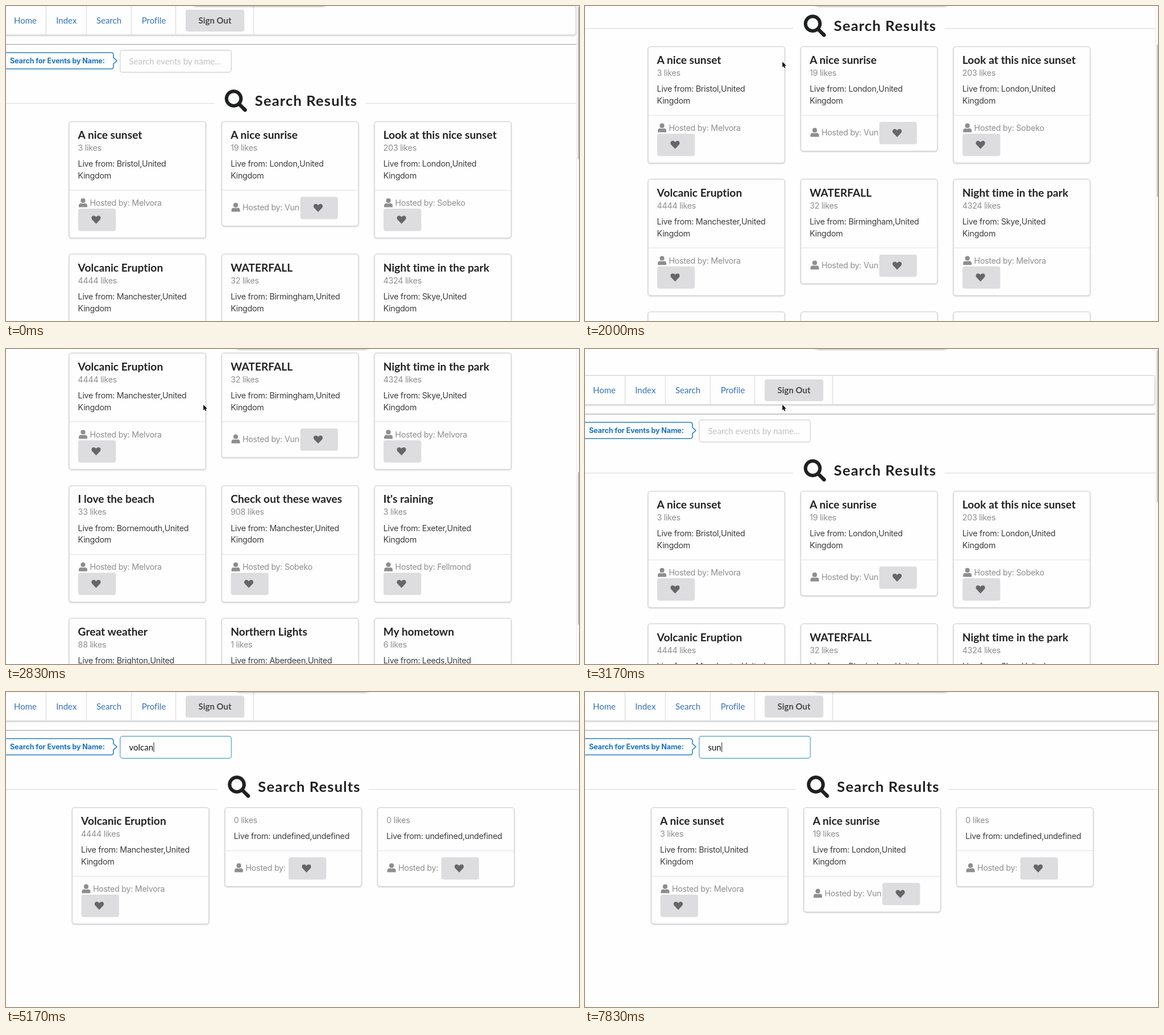
Animation, 1008 px wide and 555 px high, one loop 8 s. Source, as an HTML page:

```html
<!DOCTYPE html>
<html lang="en">
<head>
<meta charset="utf-8">
<title>Event search</title>
<style>
  html, body { margin: 0; width: 100%; height: 100%; overflow: hidden; background: #fefefe; }
  svg { display: block; }
  text { font: 14.3px Inter, sans-serif; letter-spacing: -.02em; fill: #3d3d3d; }
  .grey { fill: #8e8e8e; }
  .title { font: bold 19.2px Lato, sans-serif; letter-spacing: 0; fill: #222; }
  .heading { font: bold 25.6px Lato, sans-serif; letter-spacing: 1.1px; fill: #1f2021; }
  .nav, .field { font: 15px Lato, sans-serif; letter-spacing: 0; }
  .title, .heading, .nav, .field { font-variant-ligatures: none; }
  .nav { fill: #3572b8; text-anchor: middle; }
  .sign { font-weight: bold; fill: #48494a; }
  .field { fill: #111; }
  .hint { fill: #c2c2c4; }
  .label { font-weight: bold; font-size: 12.6px; letter-spacing: -.01em; fill: #1a74c0; }
  .box { fill: #fefefe; stroke: #d3d3d5; stroke-width: 1.3; }
  .raised { filter: drop-shadow(0 1px 1px #d4d4d5); }
  .rule { stroke: #dededf; stroke-width: 1.3; }
  .button { fill: #dddddf; }
  .notch { fill: #fff; filter: drop-shadow(0 1px 2px #0009); }
</style>
</head>
<body>
<svg id="stage" width="1008" height="555" viewBox="0 0 1008 555"></svg>
<script>
const LOOP = 8000, STEP = 1000 / 6;
const stage = document.getElementById("stage");
const pen = document.createElement("canvas").getContext("2d");

// title, likes, place, host
const events = [
  ["A nice sunset", 3, "Bristol", "Melvora"],
  ["A nice sunrise", 19, "London", "Vun"],
  ["Look at this nice sunset", 203, "London", "Sobeko"],
  ["Volcanic Eruption", 4444, "Manchester", "Melvora"],
  ["WATERFALL", 32, "Birmingham", "Vun"],
  ["Night time in the park", 4324, "Skye", "Melvora"],
  ["I love the beach", 33, "Bornemouth", "Melvora"],
  ["Check out these waves", 908, "Manchester", "Sobeko"],
  ["It's raining", 3, "Exeter", "Fellmond"],
  ["Great weather", 88, "Brighton", "Melvora"],
  ["Northern Lights", 1, "Aberdeen", "Sobeko"],
  ["My hometown", 6, "Leeds", "Melvora"],
];
const blank = ["", 0, "", ""];

// Keyframes are [step, value] pairs with straight lines between them.
const scrollKeys = [[10, 0], [11, 35], [12, 132], [13, 280], [14, 413], [15, 520], [16, 575],
  [17, 430], [18, 120], [19, -47], [20, -22], [21, -6], [22, 0]];
const notchKeys = [[0, 323], [1, 350], [2, 398]];
const cursorX = [[4, 540], [7, 410], [10, 347.3], [20, 347.3], [23, 319.8]];
const cursorY = [[4, 30], [7, 80], [10, 98.3], [20, 98.3], [23, 102.8]];

function track(keys, step) {
  const next = keys.findIndex(key => key[0] > step);
  if (next < 0) return keys[keys.length - 1][1];
  if (next === 0) return keys[0][1];
  const [s0, v0] = keys[next - 1], [s1, v1] = keys[next];
  return v0 + (v1 - v0) * (step - s0) / (s1 - s0);
}

function queryAt(step) {
  if (step >= 44) return "sun".slice(0, step - 43);
  const count = step < 35 ? Math.min(step - 25, 8) : step < 38 ? 42 - step : 40 - step;
  return "volcanic".slice(0, Math.max(0, count));
}

function resultsFor(query) {
  if (!query) return events;
  return query[0] === "v" ? [events[3], blank, blank] : [events[0], events[1], blank];
}

const text = (x, y, content, cls = "") => `<text x="${x}" y="${y}" class="${cls}">${content}</text>`;
const rect = (x, y, w, h, r, cls) =>
  `<rect x="${x}" y="${y}" width="${w}" height="${h}" rx="${r}" class="${cls}"/>`;
const line = (x1, y, x2, style = 'class="rule"') => `<path d="M${x1} ${y}H${x2}" ${style}/>`;
const at = (x, y, content) => `<g transform="translate(${x} ${y})">${content}</g>`;

const heart = '<path fill="#666668" d="M0 7.2L-6.9 0C-9.1-2.7-8.1-6.7-4.4-7-2.4-7.1-1-6 0-4.6 1-6 2.4-7.1 4.4-7 8.1-6.7 9.1-2.7 6.9 0Z"/>';
const person = '<g fill="#8e8e8e"><circle cx="7.5" cy="4" r="4.1"/><path d="M0 15v-2q0-4 4-4.3 3.5 1.3 7 0 4 .3 4 4.3v2q0 .7-1 .7H1q-1 0-1-.7z"/></g>';
const magnifier = '<g fill="none" stroke="#1f2021"><circle cx="15.8" cy="15.6" r="12.8" stroke-width="6"/>'
  + '<path d="M25.5 25.5L35.8 35.8" stroke-width="6.4"/><path d="M34.5 34.5L35.8 35.8" stroke-width="6.4" stroke-linecap="round"/></g>';
const arrow = '<path d="M0 0v9.6l2.2-2 1.4 3.3 1.6-.7-1.4-3.2h2.9z" fill="#000" stroke="#fff" paint-order="stroke"/>';

function card([title, likes, place, host], x, y) {
  const inline = host.length < 4;
  const lift = title ? 0 : 24.5, shift = title ? 0 : 45;
  const height = (inline ? 184 : 205) - shift;
  const hostY = (inline ? 156.5 : 148.5) - shift;
  const buttonX = inline ? (host ? 138 : 112) : 16;
  const buttonY = (inline ? 132.7 : 153.5) - shift;
  return at(x, y,
    rect(0, 0, 240.4, height, 4.5, "box raised")
    + text(15.6, 30.5, title, "title")
    + text(15.6, 51.5 - lift, likes + " likes", "grey")
    + text(15.6, 79.8 - lift, "Live from: " + (title ? place + ",United" : "undefined,undefined"))
    + (title ? text(15.6, 100.5, "Kingdom") : "")
    + line(0.6, 121 - shift, 239.8, 'stroke="#e6e6ec" stroke-width="1.2"')
    + at(17, hostY - 13.2, person)
    + text(36.4, hostY, "Hosted by: " + host, "grey")
    + rect(buttonX, buttonY, 66.3, 39.3, 4, "button")
    + at(buttonX + 31.5, buttonY + 19.5, heart));
}

function navigation(wide) {
  const links = [["Home", 34], ["Index", 106.3], ["Search", 181], ["Profile", 260]];
  const right = wide ? 1020 : 1002.5;
  return rect(-10, -.3, right + 10, 51.3, 4, "box raised")
    + [70.5, 141.5, 220.5, 298.5, 435.5].map(x => `<path d="M${x} 0V51" class="rule"/>`).join("")
    + links.map(([name, x]) => text(x, 31.3, name, "nav")).join("")
    + rect(316, 6.5, 103.2, 38.6, 4, "button")
    + text(367.6, 31.3, "Sign Out", "nav sign")
    + line(0, 67.7, wide ? 1008 : 1004, 'stroke="#a9a9ab" stroke-width="1.2"');
}

function searchBar(query, focused) {
  pen.font = "15px Lato, sans-serif";
  const caret = 217.5 + pen.measureText(query).width;
  return '<path d="M-9 82.2H185q4 0 4 4v5l6 5.3-6 5.3v5q0 4-4 4H-9z" fill="#fefefe" stroke="#2a80c8" stroke-width="1.6"/>'
    + text(7, 101, "Search for Events by Name:", "label")
    + `<rect x="200.8" y="78" width="195.6" height="38.8" rx="4" fill="#fefefe" stroke="${focused ? "#62acd9" : "#d5d5d7"}" stroke-width="1.4"/>`
    + text(216.5, 102.8, query || "Search events by name...", query ? "field" : "field hint")
    + (focused ? `<path d="M${caret} 88.5V106" stroke="#222"/>` : "");
}

function draw(step) {
  const query = queryAt(step), wide = query !== "";
  const scroll = track(scrollKeys, step);
  const offset = wide ? 5.5 : 0;
  const thumb = 1 + Math.max(0, scroll) * .5;

  const results = at(offset, 0,
    line(-10, 171.7, 366.5) + line(632.5, 171.7, wide ? 1008 : 1004)
    + at(384.8, 147.5, magnifier)
    + text(437.8, 175.6, "Search Results", "heading")
    + resultsFor(query).map((event, i) =>
        card(event, 111 + i % 3 * 268.6, 203.6 + Math.floor(i / 3) * 233.6)).join(""));

  const scrollbar = wide ? "" :
    '<path d="M1004 0h4v555h-4z" fill="#fafafa"/><path d="M1003.8 0V555" stroke="#e9e9ea"/>'
    + `<rect x="1006" y="${thumb}" width="6" height="270" rx="3" fill="#c2c3c4"/>`;

  stage.innerHTML = at(0, -scroll, navigation(wide) + searchBar(query, step >= 25) + results)
    + scrollbar
    + rect(track(notchKeys, step) + 3, -30, 240, 28.5, 9, "notch")
    + (step >= 4 && step < 26 ? at(track(cursorX, step), track(cursorY, step), arrow) : "");
}

let shown = -1;
function tick() {
  // The small lead keeps rounded times on the right side of a step.
  const step = Math.floor((performance.now() % LOOP + 5) / STEP) % 48;
  if (step !== shown) draw(shown = step);
  requestAnimationFrame(tick);
}
tick();
</script>
</body>
</html>
```
